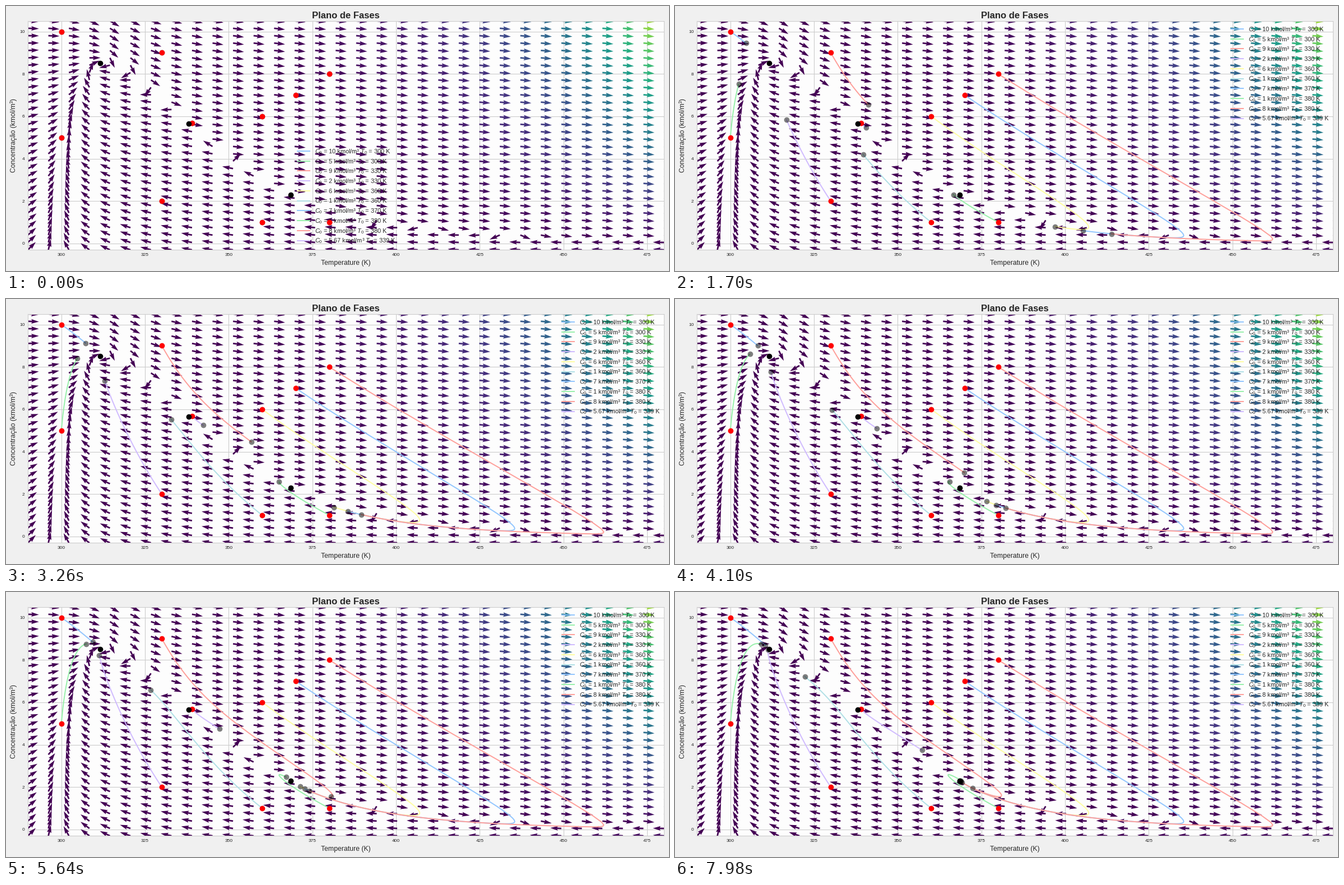
These frames come from a looping animation (1183 by 473 pixels, 8000 ms). A matplotlib script:

```python
import numpy as np
import matplotlib.pyplot as plt
from matplotlib.animation import FuncAnimation

W, H, DPI = 1183, 473, 100
FRAMES, STEP_MS = 400, 20
LEFT, RIGHT, TOP, BOTTOM = 39, 1174, 26.6, 435.2
T_LIM, C_LIM = (290, 480), (-0.3, 10.5)
INK = "0.15"
PASTEL = ["#92C6FF", "#97F0AA", "#FF9F9A", "#D0BBFF", "#FFFEA3", "#B0E0E6"]

STARTS = [(10, 300), (5, 300), (9, 330), (2, 330), (6, 360),
          (1, 360), (7, 370), (1, 380), (8, 380), (5.67, 339)]
STEADY = [(8.52, 311.6), (5.64, 338.0), (2.30, 368.5)]
COLORS = [PASTEL[i % len(PASTEL)] for i in range(len(STARTS))]

# Stirred-tank reactor: feed and jacket at 298.15 K, time in hours
K0, E_R, T_FEED, C_FEED = 9703 * 3600, 5959.1, 298.15, 10
HEAT, COOLING = 5960 / 500, 150 / 500
DT, SUBSTEPS = 0.01, 10

LEGEND_MOVE = 11
LEGEND_LOW, LEGEND_HIGH = (520, 259), (992, 41)

plt.rcParams["font.family"] = "Liberation Sans"
plt.rcParams["text.color"] = INK
plt.rcParams.update({
    "mathtext.fontset": "custom",
    "mathtext.rm": "Liberation Sans",
    "mathtext.it": "Liberation Sans:italic",
})


def rates(c, t):
    r = K0 * np.exp(-E_R / t) * c
    return C_FEED - c - r, (1 + COOLING) * (T_FEED - t) + HEAT * r


def integrate():
    """Runge-Kutta paths, shape (FRAMES, 2, number of starts)."""
    f = lambda s: np.array(rates(*s))
    state, h = np.array(STARTS, float).T, DT / SUBSTEPS
    path = [state]
    for _ in range(FRAMES - 1):
        for _ in range(SUBSTEPS):
            a = f(state)
            b = f(state + h / 2 * a)
            c = f(state + h / 2 * b)
            d = f(state + h * c)
            state = state + h / 6 * (a + 2 * b + 2 * c + d)
        path.append(state)
    return np.array(path)


def plot_axes():
    ax = fig.add_axes([LEFT / W, 1 - BOTTOM / H,
                       (RIGHT - LEFT) / W, (BOTTOM - TOP) / H])
    ax.set(xlim=T_LIM, ylim=C_LIM)
    return ax


def label(x, y, text, size, **kw):
    fig.text(x / W, 1 - y / H, text, fontsize=size, va="baseline", **kw)


def draw_legend(x, y):
    for (c0, t0), color in zip(STARTS, COLORS):
        fig.add_artist(plt.Line2D([x / W, (x + 22) / W], [1 - y / H] * 2,
                                  color=color, lw=1.4))
        label(x + 31, y + 4, f"$C_0$ = {c0:g} kmol/m³ $T_0$ = {t0} K", 7.8)
        y += 17.73


def bake(legend_at):
    """Render everything that stands still into one image."""
    fig.clf()
    ax = plot_axes()
    ax.set_facecolor("#fdfdfd")
    ax.set_axisbelow(True)
    ax.grid(color="0.8", lw=0.8)
    for spine in ax.spines.values():
        spine.set(color="0.8", lw=0.8)
    ax.set_xticks(range(300, 480, 25))
    ax.set_yticks(range(0, 11, 2))
    ax.tick_params(length=0, pad=4, labelsize=6, labelcolor=INK)

    t, c = np.meshgrid(np.linspace(*T_LIM, 32), np.linspace(*C_LIM, 32))
    dc, dt = rates(c, t)
    speed = np.hypot(dc, dt)
    ax.quiver(t, c, dt / speed, dc / speed, speed, cmap="viridis")

    mid_x, mid_y = (LEFT + RIGHT) / 2, (TOP + BOTTOM) / 2
    label(mid_x, 21.5, "Plano de Fases", 12, weight="bold", ha="center")
    label(mid_x, 461.5, "Temperature (K)", 8.8, ha="center")
    label(17.5, mid_y, "Concentração (kmol/m³)", 8.8, ha="center",
          rotation=90, rotation_mode="anchor")
    draw_legend(*legend_at)
    fig.canvas.draw()
    return np.array(fig.canvas.buffer_rgba())


def dots(points, color, **kw):
    c, t = np.array(points, float).T
    return ax.plot(t, c, "o", color=color, ms=7, mew=0, **kw)[0]


fig = plt.figure(figsize=(W / DPI, H / DPI), dpi=DPI, facecolor="#f0f0f0")
paths = integrate()
low, high = bake(LEGEND_LOW), bake(LEGEND_HIGH)

fig.clf()
backdrop = fig.figimage(low, zorder=-1)
ax = plot_axes()
ax.axis("off")
traces = [ax.plot([], [], color=color, lw=1.4)[0] for color in COLORS]
heads = [dots([start], "black", alpha=0.5) for start in STARTS]
dots(STARTS, "red")
dots(STEADY, "black")


def update(n):
    backdrop.set_data(low if n < LEGEND_MOVE else high)
    for i, (trace, head) in enumerate(zip(traces, heads)):
        c, t = paths[:n + 1, :, i].T
        trace.set_data(t, c)
        head.set_data(t[-1:], c[-1:])
    return [backdrop, *traces, *heads]


anim = FuncAnimation(fig, update, frames=FRAMES, interval=STEP_MS,
                     init_func=lambda: update(0), repeat=True,
                     repeat_delay=0, blit=False)
plt.show()
```
